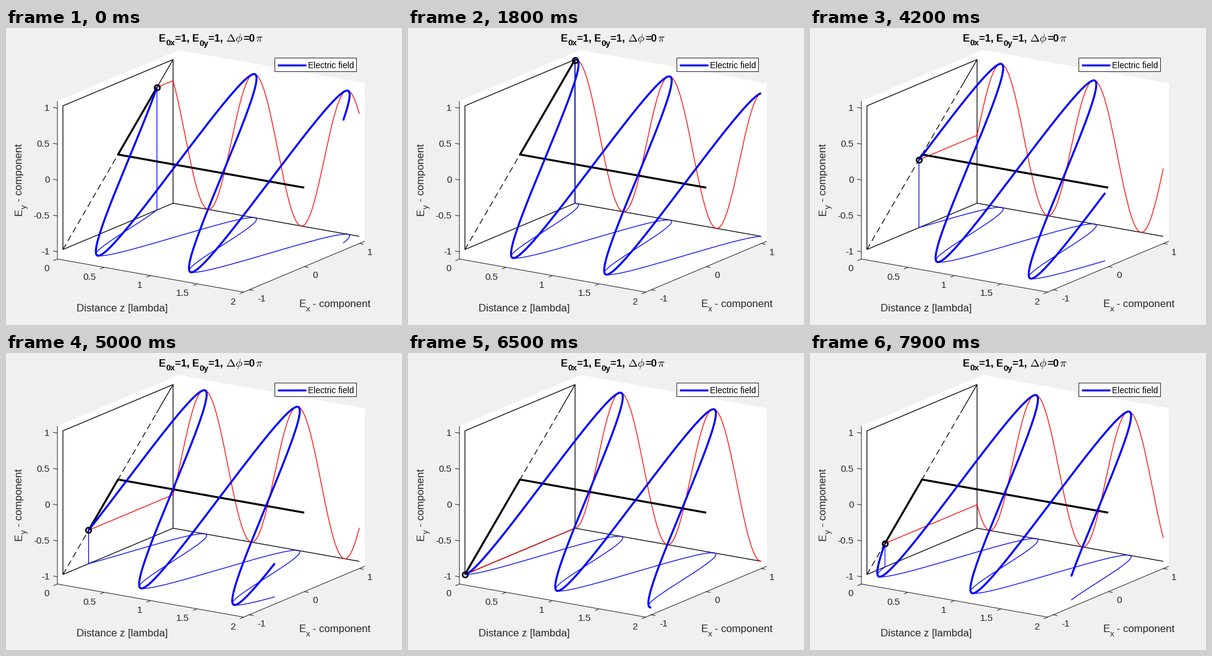
Write a matplotlib script that moves like this. It is 640 px wide and 480 px high and loops after 8 s.

```python
import numpy as np
import matplotlib.pyplot as plt
from matplotlib.animation import FuncAnimation
from matplotlib.patches import Polygon, Rectangle

W, H, DPI = 640, 480, 100
FRAMES, STEP_MS, HOLD = 80, 100, 4
PT = 72 / DPI                     # points per pixel
GRAY = "#262626"
BLUE, RED = "#0000ff", "#ff0000"
TICK, LABEL, SMALL = 15.3, 16.8, 13.7
THIN, THICK = 1.25, 3.2
LIM = 1.1

plt.rcParams["font.family"] = "Liberation Sans"
plt.rcParams["mathtext.fontset"] = "cm"

fig = plt.figure(figsize=(W / DPI, H / DPI), dpi=DPI, facecolor="#f0f0f0")
ax = fig.add_axes([0, 0, 1, 1])
ax.set_xlim(0, W)
ax.set_ylim(H, 0)
ax.axis("off")


def project(z, x, y):
    """Orthographic view: (distance, Ex, Ey) to pixels."""
    px = 181 + 150.5 * z + 89 * x + 0 * y
    py = 204.5 + 26.75 * z - 37.4 * x - 116.1 * y
    return px, py


def path(*points):
    return np.array([project(*p) for p in points]).T


def line(xs=(), ys=(), color="black", width=THIN, order=2, **kw):
    kw.setdefault("solid_capstyle", "butt")
    kw.setdefault("solid_joinstyle", "round")
    return ax.plot(xs, ys, color=color, lw=width * PT, zorder=order, **kw)[0]


def text(x, y, s, size=TICK, color=GRAY, **kw):
    return ax.text(x, y, s, fontsize=size * PT, color=color, va="baseline",
                   zorder=10, **kw)


def runs(cx, cy, parts, size, color=GRAY, upright=False, **kw):
    """Centre a line made of (string, scale) parts; small parts are subscripts."""
    items, widths = [], []
    for s, scale in parts:
        t = text(0, 0, s, size * scale, color,
                 rotation=90 if upright else 0, rotation_mode="anchor", **kw)
        box = t.get_window_extent()
        items.append((t, 6.5 if scale < 1 else 0))
        widths.append(box.height if upright else box.width)
    pos = -sum(widths) / 2
    for (t, drop), w in zip(items, widths):
        t.set_position((cx + drop, cy - pos) if upright else (cx + pos, cy + drop))
        pos += w


def tick(point, direction, length=7):
    (x, y), d = project(*point), np.array(direction)
    dx, dy = length * d / np.hypot(*d)
    line([x, x + dx], [y, y + dy], GRAY, 1, 1)
    return x, y


# Axes box
hull = path((0, -LIM, -LIM), (0, -LIM, LIM), (0, LIM, LIM),
            (2, LIM, LIM), (2, LIM, -LIM), (2, -LIM, -LIM))
ax.add_patch(Polygon(hull.T, fc="white", ec="none", zorder=0))
line(*path((0, -LIM, LIM), (0, -LIM, -LIM), (2, -LIM, -LIM), (2, LIM, -LIM)),
     GRAY, 1, 1)

for v in (-1, -0.5, 0, 0.5, 1):
    x, y = tick((0, -LIM, v), (-150.5, -26.75))
    text(70.5, y + 4.5, f"{v:g}", ha="right")
for v in (0, 0.5, 1, 1.5, 2):
    x, y = tick((v, -LIM, -LIM), (-89, 37.4))
    text(x - 13, y + 20, f"{v:g}", ha="right")
for v in (-1, 0, 1):
    x, y = tick((2, v, -LIM), (150.5, 26.75))
    text(x + 13, y + 18.5, f"{v:g}", ha="left")

SUB, MATH = 0.8, 1.1
runs(188, 458, [("Distance z [lambda]", 1)], LABEL)
runs(531.5, 451, [("E", 1), ("x", SUB), (" - component", 1)], LABEL)
runs(26, 245, [("E", 1), ("y", SUB), (" - component", 1)], LABEL, upright=True)
runs(331, 22, [("E", 1), ("0x", SUB), ("=1, ", 1),
               ("E", 1), ("0y", SUB), ("=1, ", 1),
               (r"$\Delta\phi$", MATH), ("=0", 1), (r"$\pi$", MATH)],
     LABEL, "black", weight="bold")

# Plane at z = 0, polarisation diagonal, wall edge
line(*path((0, -1, -1), (0, 1, -1), (0, 1, 1), (0, -1, 1), (0, -1, -1)))
line(*path((0, -1, -1), (0, 0.7, 0.7)), ls=(0, (10 / THIN, 6 / THIN)),
     dash_capstyle="butt")
line(*path((0, 0.7, 0.7), (0, 1, 1)))
line(*path((0, 1, -1), (2, 1, -1)))

# Legend
ax.add_patch(Rectangle((434, 48), 132, 22, fc="white", ec=GRAY, lw=PT, zorder=8))
line([439, 485], [59.5, 59.5], BLUE, THICK, 9)
text(488, 65, "Electric field", SMALL, "black")

# Moving parts
wall = line(color=RED, order=3)
floor = line(color=BLUE, order=3)
vector = line(width=THICK, order=4)
field = line(color=BLUE, width=THICK, order=5)
tip = line(order=6, marker="o", ms=8.6 * PT, mfc="none", mec="black",
           mew=2.6 * PT)

z = np.linspace(0, 2, 201)
z_tail = np.r_[0, z]              # repeats z = 0 for the link to the tip


def draw(n):
    k = max(0, n - HOLD)
    phase = 2 * np.pi * k / 99 - np.pi / 4
    e = np.cos(2 * np.pi * z - phase)
    e0 = e[0]
    e_tail = np.r_[e0, e]
    edge = np.ones_like(e_tail)
    edge[0] = e0
    wall.set_data(*project(z_tail, edge, e_tail))
    drop = -np.ones_like(e_tail)
    drop[0] = e0
    floor.set_data(*project(z_tail, e_tail, drop))
    field.set_data(*project(z, e, e))
    vector.set_data(*path((0, e0, e0), (0, 0, 0), (2, 0, 0)))
    tip.set_data(*path((0, e0, e0)))
    return wall, floor, field, vector, tip


anim = FuncAnimation(fig, draw, frames=FRAMES, interval=STEP_MS,
                     init_func=lambda: draw(0), repeat=True, repeat_delay=0)
plt.show()
```
